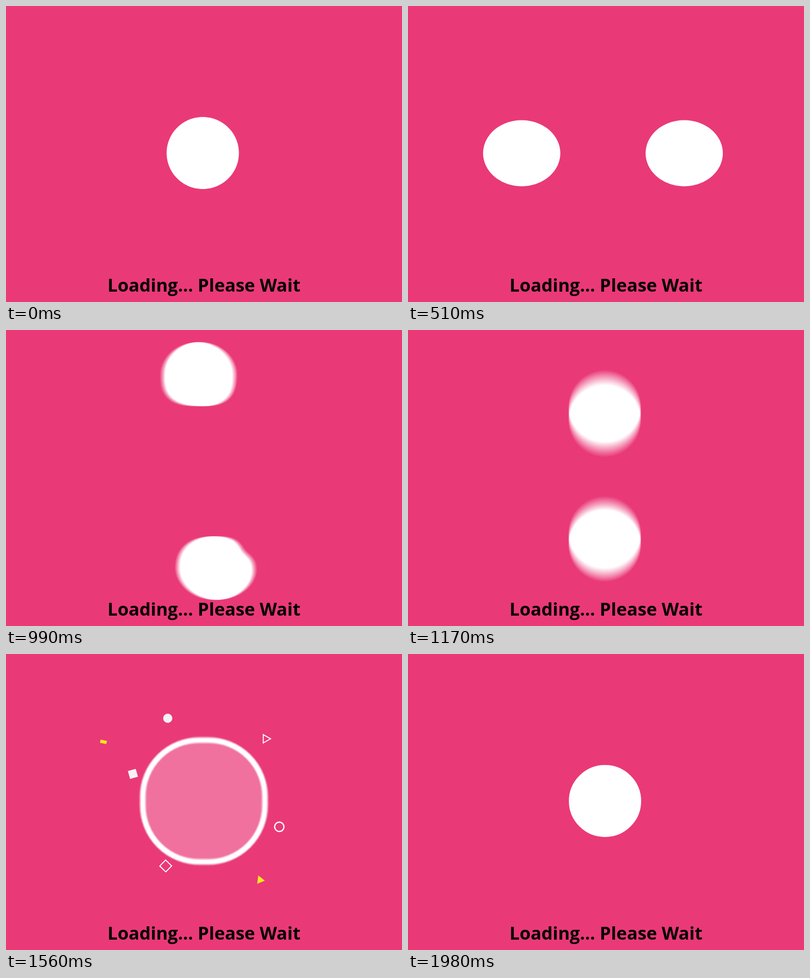
Recreate the animation shown at these times as an HTML page with a canvas. Size 800 by 600 pixels, loop 2.13 s.

```html
<!DOCTYPE html>
<html lang="en">
<head>
<meta charset="utf-8">
<title>Loading</title>
<style>
  html, body { margin: 0; width: 100%; height: 100%; overflow: hidden; background: #ea3977; }
  canvas, svg { position: absolute; left: 0; top: 0; width: 800px; height: 600px; }
  text { font: 700 36px "Open Sans", "Noto Sans", sans-serif; text-anchor: middle; fill: #000; }
</style>
</head>
<body>
<canvas id="stage" width="800" height="600"></canvas>
<svg viewBox="0 0 800 600"><text x="400" y="579">Loading... Please Wait</text></svg>
<script>
const LOOP = 2130, STEP = 30, SHUTTER = 15, SAMPLES = 16;
const CX = 397.5, CY = 298, R = 73, STROKE = 11, RAD = Math.PI / 180;
const stage = document.getElementById('stage').getContext('2d');
const layerCanvas = document.createElement('canvas');
layerCanvas.width = 800;
layerCanvas.height = 600;
const layer = layerCanvas.getContext('2d');

const mix = (a, b, u) => a + (b - a) * u;
const smooth = u => u * u * (3 - 2 * u);
const easeOut = (u, p) => 1 - (1 - u) ** p;
const backIn = u => u * u * (2.1 * u - 1.1);
// Progress from 0 to 1 over a span, and a soft peak around a time.
const part = (t, from, span) => Math.min(1, Math.max(0, (t - from) / span));
const bump = (t, peak) => Math.exp(-(((t - peak) / 90) ** 2));

// The point both blobs circle: time, x, y
const PIVOT = [
  [150, CX, CY], [650, 393, 298.5], [780, 382.5, 295],
  [990, 407, 286], [1080, CX, 288], [1200, CX, CY]
];

function pivotAt(t) {
  const next = PIVOT.findIndex(p => p[0] > t);
  if (next <= 0) return [CX, CY];
  const a = PIVOT[next - 1], b = PIVOT[next];
  const u = smooth((t - a[0]) / (b[0] - a[0]));
  return [mix(a[1], b[1], u), mix(a[2], b[2], u)];
}

// Change of each measure at the start [0] and the end [1] of the swing
const BLOBS = [
  { side: 180, outer: [-1, -6.5], inner: [-25, -9.5], across: [8, 0], power: [0.5, 0.7], dent: 0 },
  { side: 0, outer: [-4, -8.5], inner: [-4, -8.5], across: [3, 5], power: [0, 0.3], dent: 0.14 }
];
const DENT_AT = 233 * RAD;

function addBlob(path, blob, t) {
  const split = part(t, 150, 500);
  const turn = smooth(part(t, 750, 280));
  const dist = (203 * smooth(split) - 6 * turn) * (1 - backIn(part(t, 1000, 215)));
  const scale = 1 - part(t, 1195, 30);
  if (scale <= 0) return;

  const start = bump(t, 780), end = bump(t, 990);
  const bend = ([a, b]) => a * start + b * end;
  const stretch = Math.sin(Math.PI * split);
  const outer = R + bend(blob.outer) + 6.5 * stretch;
  const inner = R + bend(blob.inner) + 6.5 * stretch;
  const across = R + bend(blob.across) - 7.8 * stretch;
  const innerExp = 2 / (2 + bend(blob.power));

  const [px, py] = pivotAt(t);
  const way = (blob.side + 90 * turn) * RAD;
  const tilt = (blob.side + 97 * turn) * RAD;
  const cos = Math.cos(tilt), sin = Math.sin(tilt);
  const x = px + dist * Math.cos(way), y = py + dist * Math.sin(way);
  const shift = (inner - outer) / 2;

  // An ellipse outside, a squarer half facing the pivot
  const count = 120;
  for (let i = 0; i < count; i++) {
    const a = i / count * 2 * Math.PI;
    const c = Math.cos(a), s = Math.sin(a);
    const exp = c < 0 ? innerExp : 1;
    const dent = 1 - blob.dent * end * Math.exp(-(((a - DENT_AT) / 0.4) ** 2));
    const u = scale * (shift + dent * (c < 0 ? -inner : outer) * Math.abs(c) ** exp);
    const v = scale * dent * across * Math.sign(s) * Math.abs(s) ** exp;
    path[i ? 'lineTo' : 'moveTo'](x + u * cos - v * sin, y + u * sin + v * cos);
  }
  path.closePath();
}

function drawBlobs(g, t) {
  const path = new Path2D();
  BLOBS.forEach(blob => addBlob(path, blob, t));
  g.fill(path);
}

function box(g, half, radius) {
  g.beginPath();
  g.roundRect(-half, -half, 2 * half, 2 * half, Math.max(0, radius));
}

// A ring bursts open, shrinks to a turning rounded square and ends as a disc.
function drawRing(g, t) {
  const burst = 138 * easeOut(part(t, 1265, 220), 1.77);
  const half = mix(burst, R - STROKE / 2, smooth(part(t, 1490, 240)));
  if (half <= 0) return;
  const radius = half * (1 - 0.45 * bump(t, 1680));
  const inner = half - STROKE / 2 + 0.5;
  g.save();
  g.translate(mix(400.5, 398, part(t, 1380, 600)), CY);
  g.rotate(smooth(part(t, 1560, 340)) * Math.PI / 2);
  box(g, half, radius);
  g.lineWidth = Math.min(STROKE, half * 2);
  g.stroke();
  if (inner > 0) {
    g.globalAlpha *= smooth(part(t, 1480, 225));
    box(g, inner, radius - STROKE / 2);
    g.fill();
  }
  g.restore();
}

const PALE = '#f6f2f4', YELLOW = '#f9e81f';
const disc = r => g => g.arc(0, 0, r, 0, 2 * Math.PI);
const rect = (w, h) => g => g.rect(-w / 2, -h / 2, w, h);
const triangle = (r, turn) => g => {
  for (let i = 0; i < 3; i++) {
    const a = (turn + 120 * i) * RAD;
    g.lineTo(r * Math.cos(a), r * Math.sin(a));
  }
  g.closePath();
};
const BITS = [
  { x: 319, y: 112, fill: PALE, shape: disc(9.3) },
  { x: 175, y: 165, turn: 30, fill: YELLOW, shape: rect(13, 6.5), early: 120 },
  { x: 241, y: 237, turn: 2, fill: PALE, shape: rect(16.5, 16.5) },
  { x: 538.5, y: 158, line: 2, shape: triangle(9.8, -102) },
  { x: 569, y: 356, line: 2.6, shape: disc(9.4) },
  { x: 314.5, y: 444, turn: -28, line: 2, shape: rect(17, 17) },
  { x: 526, y: 475.5, fill: YELLOW, shape: triangle(9.7, -94) }
];

function drawBits(g, t) {
  const reach = easeOut(part(t, 1420, 260), 3) + 0.12 * part(t, 1680, 300);
  for (const { x, y, turn = 0, fill, line, shape, early = 0 } of BITS) {
    const size = part(t, 1440, 120) * (1 - smooth(part(t, 1800 - early, 170)));
    if (size <= 0) continue;
    g.save();
    g.translate(mix(CX, x, reach), mix(CY, y, reach));
    g.rotate((turn + (t - 1680) * 0.15) * RAD);
    g.scale(size, size);
    g.beginPath();
    shape(g);
    g.fillStyle = fill;
    g.strokeStyle = '#fff';
    g.lineWidth = line;
    if (fill) g.fill();
    else g.stroke();
    g.restore();
  }
}

function render(t) {
  // White shapes are summed over the open shutter to get motion blur.
  const n = t >= 690 && t < 1980 ? SAMPLES : 1;
  layer.globalCompositeOperation = 'source-over';
  layer.clearRect(0, 0, 800, 600);
  layer.globalCompositeOperation = 'lighter';
  layer.globalAlpha = 1 / n;
  layer.fillStyle = layer.strokeStyle = '#fff';
  for (let i = 0; i < n; i++) {
    const s = t + ((i + 0.5) / n - 0.5) * SHUTTER;
    if (s < 1230) drawBlobs(layer, s);
    else drawRing(layer, s);
  }
  stage.fillStyle = '#ea3977';
  stage.fillRect(0, 0, 800, 600);
  drawBits(stage, t);
  stage.drawImage(layerCanvas, 0, 0);
}

const start = performance.now();
function tick() {
  const t = (performance.now() - start) % LOOP;
  render(Math.floor(t / STEP) * STEP);
  requestAnimationFrame(tick);
}
tick();
</script>
</body>
</html>
```
